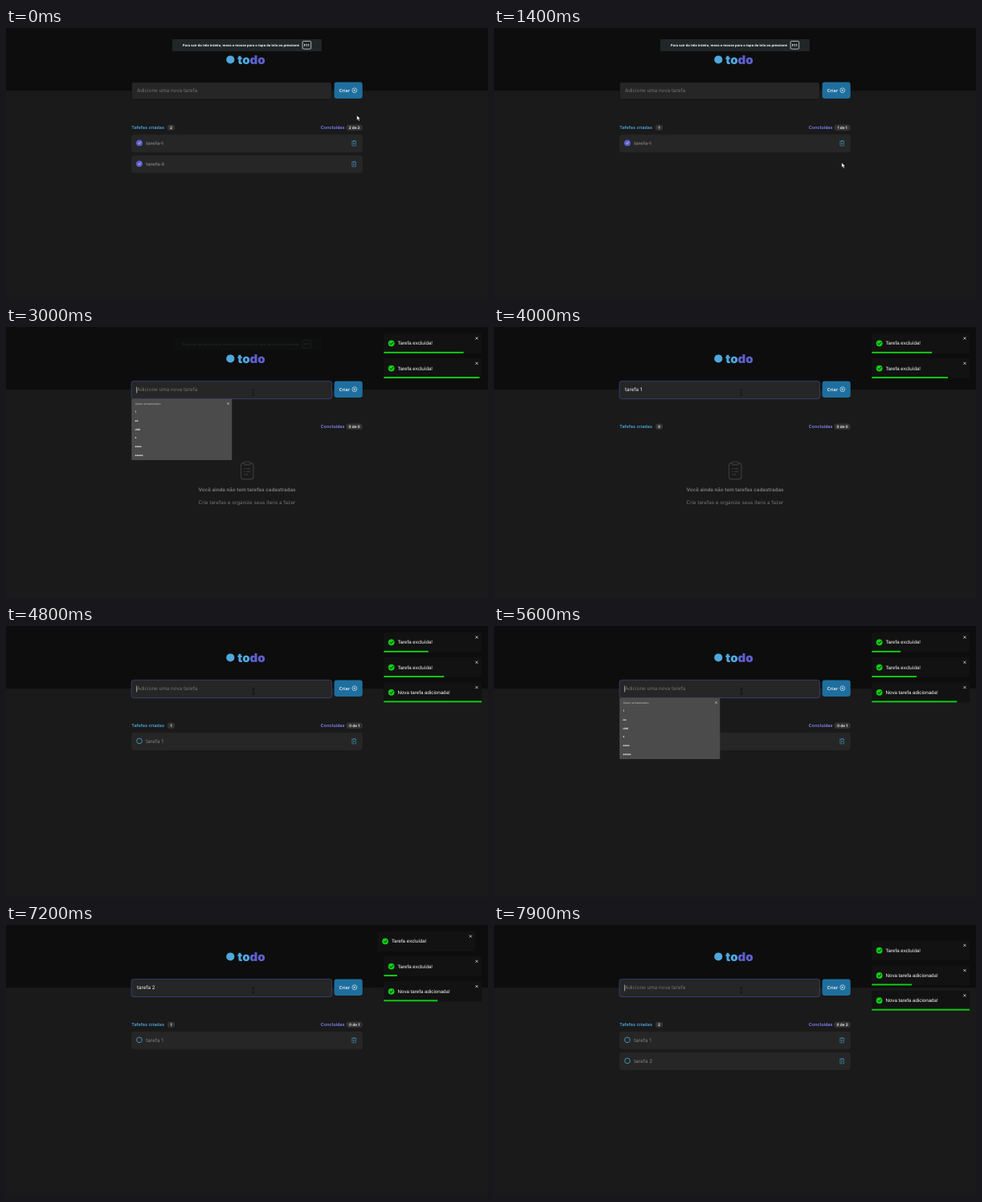
Animation, 600 px wide and 338 px high, one loop 8 s. Source, as an HTML page:

```html
<!DOCTYPE html>
<html lang="pt">
<head>
<meta charset="utf-8">
<style>
  html, body { margin: 0; height: 100%; overflow: hidden; background: #1a1a1a; }
  svg { display: block; width: 600px; height: 338px; }
  text { font-family: Inter, sans-serif; text-rendering: geometricPrecision; white-space: pre; }
  .toast { font-family: "Liberation Sans", Arial, sans-serif; }
  .tip { font-family: "Open Sans", sans-serif; }
</style>
</head>
<body>
<svg id="stage" viewBox="0 0 1536 865.28"></svg>
<script>
const LOOP = 8000;
const BLUE = '#4ea8de', PURPLE = '#5e60ce', GREEN = '#0fce14';
const stage = document.getElementById('stage');

const clamp = x => Math.min(1, Math.max(0, x));

function bezier(x1, y1, x2, y2) {
  const at = (a, b, s) => 3 * a * s * (1 - s) ** 2 + 3 * b * s * s * (1 - s) + s ** 3;
  return x => {
    let lo = 0, hi = 1;
    for (let i = 0; i < 20; i++) {
      const mid = (lo + hi) / 2;
      if (at(x1, x2, mid) < x) lo = mid; else hi = mid;
    }
    return at(y1, y2, lo);
  };
}
const ease = bezier(.25, .1, .25, 1);
const easeOut = bezier(.215, .61, .355, 1);

// Interpolates [position, value] stops, easing each segment.
function track(p, stops, fn) {
  if (p <= stops[0][0]) return stops[0][1];
  for (let i = 1; i < stops.length; i++) {
    const [a, from] = stops[i - 1], [b, to] = stops[i];
    if (p < b) return from + (to - from) * fn((p - a) / (b - a));
  }
  return stops[stops.length - 1][1];
}

const rect = (x, y, w, h, fill, r = 0, extra = '') =>
  `<rect x="${x}" y="${y}" width="${w}" height="${h}" rx="${r}" fill="${fill}" ${extra}/>`;
const label = (x, y, size, fill, str, weight = 400, extra = '') =>
  `<text x="${x}" y="${y}" font-size="${size}" fill="${fill}" font-weight="${weight}" ${extra}>${str}</text>`;
const line = (d, color, width = 2, extra = '') =>
  `<path d="${d}" fill="none" stroke="${color}" stroke-width="${width}" ${extra}/>`;
const circle = (x, y, r, fill, extra = '') =>
  `<circle cx="${x}" cy="${y}" r="${r}" fill="${fill}" ${extra}/>`;
const MIDDLE = 'text-anchor="middle"', END = 'text-anchor="end"';

const FOCUS = 2800, ADD_1 = 4230, ADD_2 = 7210;

function tasksAt(t) {
  const done = n => ({ name: 'tarefa ' + n, done: true });
  const open = n => ({ name: 'tarefa ' + n, done: false });
  if (t < 1360) return [done(1), done(3)];
  if (t < 2175) return [done(1)];
  if (t < ADD_1) return [];
  if (t < ADD_2) return [open(1)];
  return [open(1), open(2)];
}

function typedAt(t) {
  if (t < ADD_1) return 'tarefa 1'.slice(0, Math.max(0, Math.floor((t - 3200) / 90) + 1));
  if (t >= ADD_2) return '';
  const keys = [5700, 5830, 5960, 6090, 6220, 6350, 6600, 6850];
  return 'tarefa 2'.slice(0, keys.filter(k => t >= k).length);
}

function header(t) {
  const shown = 1 - clamp((t - 2600) / 440);
  let s = rect(0, 0, 1536, 200, '#0d0d0d');
  s += `<g opacity="${shown}">` + rect(530, 36, 476, 38, '#212629', 3) +
    label(563, 58.5, 10.4, '#fff',
      'Para sair da tela inteira, mova o mouse para o topo da tela ou pressione', 700, 'class="tip"') +
    rect(945, 42, 27, 25, 'none', 3, 'stroke="#ddd" stroke-width="2"') +
    label(958.5, 58.5, 10.4, '#fff', 'F11', 700, MIDDLE + ' class="tip"') + '</g>';
  s += circle(715, 101, 13, BLUE);
  s += label(738, 115, 38.5, BLUE, `to<tspan fill="${PURPLE}">do</tspan>`, 900);
  return s;
}

function form(t, typed) {
  const focused = t >= FOCUS;
  let s = focused
    ? rect(399.5, 172.5, 639, 57, '#262626', 8, `stroke="${PURPLE}" stroke-width="1.5" stroke-opacity=".75"`)
    : rect(400.5, 173.5, 637, 54, '#262626', 8, 'stroke="#0d0d0d" stroke-width="1"');
  s += typed ? label(417, 206, 16, '#f2f2f2', typed)
    : label(417, 206, 16, '#757575', 'Adicione uma nova tarefa');
  if (focused && !typed && (t + 500) % 1000 < 550) s += rect(416, 191, 1.6, 20, '#f2f2f2');
  s += rect(1046, 173, 90, 52, '#1e6f9f', 8);
  s += label(1062, 204, 14, '#f2f2f2', 'Criar', 600);
  s += circle(1110.5, 199, 7.5, 'none', 'stroke="#f2f2f2" stroke-width="1.7"');
  s += line('M1107 199h7M1110.5 195.5v7', '#f2f2f2', 1.6);
  return s;
}

function pill(x, w, str) {
  return rect(x, 308.5, w, 19, '#333', 9.5) + label(x + w / 2, 322.2, 12, '#e6e6e6', str, 700, MIDDLE);
}

function row(task, i) {
  const y = 368 + i * 66.5;
  let s = rect(400.5, y - 27, 735, 55, '#262626', 8, 'stroke="#303030" stroke-width="1"');
  if (task.done) {
    s += circle(425, y - 1, 10, PURPLE) + line(`M421 ${y - 1}l3 3l5 -6`, '#f2f2f2', 1.8);
  } else {
    s += circle(425, y - 1, 8.5, 'none', `stroke="${BLUE}" stroke-width="2"`);
  }
  s += label(446, y + 6, 16, task.done ? '#777' : '#858585', task.name, 400,
    task.done ? 'text-decoration="line-through"' : '');
  s += line(`M1101 ${y - 6}h16M1106 ${y - 6}v-2.5h6v2.5M1103 ${y - 6}v14h12v-14M1107 ${y - 2}v6M1111 ${y - 2}v6`,
    '#4093bd', 1.6);
  return s;
}

function empty(t) {
  const icon = t >= 2500, dy = icon ? 56 : 0;
  let s = '';
  if (icon) {
    s += rect(749, 435, 39, 51, 'none', 7, 'stroke="#3b3b3b" stroke-width="3"');
    s += rect(759, 430, 19, 10, '#1a1a1a', 3, 'stroke="#3b3b3b" stroke-width="3"');
    s += line('M758 453h4M766 453h13M758 462h4M766 462h13M758 471h13', '#3b3b3b', 3);
  }
  s += label(768, 468 + dy, 16, '#808080', 'Você ainda não tem tarefas cadastradas', 600, MIDDLE);
  s += label(768, 510 + dy, 16, '#757575', 'Crie tarefas e organize seus itens a fazer', 400, MIDDLE);
  return s;
}

function list(t) {
  const tasks = tasksAt(t), n = tasks.length;
  const done = tasks.filter(x => x.done).length;
  return label(400, 322, 14, BLUE, 'Tafefas criadas', 600) + pill(514, 24, n) +
    label(1079, 322, 14, '#8284fa', 'Concluídas', 600, END) + pill(1084, 52, `${done} de ${n}`) +
    (n ? tasks.map(row).join('') : empty(t));
}

function suggestions(t, typed) {
  let items = [];
  if (!typed && (t >= 2870 && t < ADD_1 || t >= 5500 && t < ADD_2)) {
    items = ['1', 'aa', 'ddd', 's', 'aaaa', 'aaaaa'];
  } else if (t > ADD_1 && typed && 'tarefa 1'.startsWith(typed)) {
    items = ['tarefa 1'];
  }
  if (!items.length) return '';
  let s = rect(400, 230, 320, 31 + items.length * 27.3, '#4b4b4b', 2);
  s += label(412, 248, 8.4, '#c4c4c4', 'Dados armazenados');
  s += line('M705 241.5l6 6M711 241.5l-6 6', '#eee', 1.6);
  items.forEach((item, i) => s += label(411, 275 + i * 27.3, 8.8, '#fff', item, 600));
  return s;
}

// Each toast enters for 700 ms, counts down 5 s, leaves for 700 ms, then its slot folds away.
const toasts = [
  [1375, 'Tarefa excluída!'], [2185, 'Tarefa excluída!'],
  [ADD_1 + 15, 'Nova tarefa adicionada!'], [ADD_2 + 5, 'Nova tarefa adicionada!']
];

function toastStack(t) {
  let y = 20, s = '';
  for (const [start, text] of toasts) {
    if (t < start) continue;
    const age = t - start, inP = age / 700, outP = (age - 5715) / 700;
    const left = 1 - clamp((age - 700) / 5000);
    const dx = outP > 0
      ? track(outP, [[0, 0], [.2, -20], [1, 2000]], ease)
      : track(inP, [[0, 3000], [.6, -25], [.75, 10], [.9, -5], [1, 0]], easeOut);
    const alpha = outP > .2 ? 1 - ease(clamp((outP - .2) / .8)) : easeOut(clamp(inP / .6));
    if (outP < 1) {
      s += `<g transform="translate(${1204 + dx} ${y})" opacity="${alpha}">` +
        rect(0, 0, 312, 64, '#121212', 4) +
        circle(24, 32, 10, GREEN) + line('M19 32l4 4l7 -8', '#121212', 2.5) +
        label(44, 37.5, 15.8, '#fff', text, 400, 'class="toast"') +
        line('M292 12l8 8M300 12l-8 8', '#ddd', 2) +
        rect(0, 59, 312 * left, 5, GREEN) + '</g>';
    }
    y += 80 * (1 - ease(clamp((age - 6415) / 300)));
  }
  return s;
}

function pointer(t) {
  if (t >= 2620) return line('M784 200h8M788 200v18M784 218h8', '#0c0c0c', 1.6);
  const smooth = x => x * x * (3 - 2 * x);
  const x = track(t, [[0, 1118], [450, 1146], [900, 1108], [2180, 1108], [2400, 810], [2650, 788]], smooth);
  const y = track(t, [[0, 279], [450, 350], [900, 430], [1450, 430], [1800, 367], [2180, 367], [2400, 254], [2650, 205]], smooth);
  return `<path transform="translate(${x} ${y})" d="M0 0v15l3.5 -3l2.5 6l3 -1.300l-2.500 -5.700h4.500z" fill="#fff" stroke="#000" stroke-width="1"/>`;
}

function draw() {
  const t = performance.now() % LOOP, typed = typedAt(t);
  stage.innerHTML = header(t) + form(t, typed) + list(t) + suggestions(t, typed) + toastStack(t) + pointer(t);
  requestAnimationFrame(draw);
}
draw();
</script>
</body>
</html>
```
